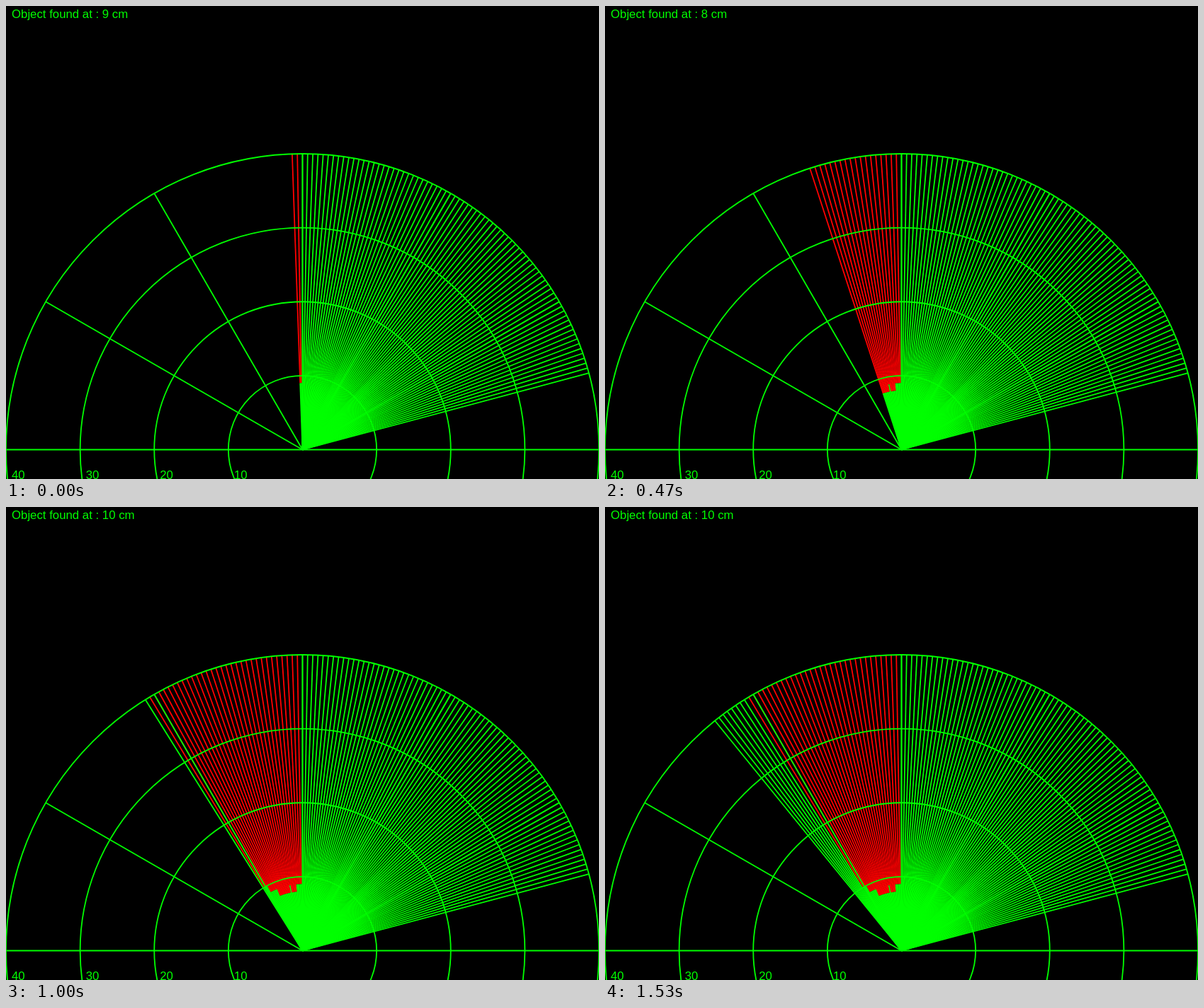
An HTML page with a canvas for the animation above (1590 ms loop, 837 px wide and 669 px high).

```html
<!DOCTYPE html>
<html lang="en">
<head>
<meta charset="utf-8">
<title>Radar sweep</title>
<style>
  html, body { margin: 0; height: 100%; overflow: hidden; background: #000; }
  canvas { display: block; }
</style>
</head>
<body>
<canvas width="837" height="669"></canvas>
<script>
const ctx = document.querySelector('canvas').getContext('2d');
const CX = 418.5, CY = 627.5, R = 418.5, CM = R / 40;
const GREEN = '#0f0', RED = '#f00';
const LOOP = 1590, STEPS = 24, FIRST_ANGLE = 15;

// [step, sweep angle in degrees]
const sweep = [[0, 92], [4, 100], [7, 108], [9, 111], [13, 119], [17, 124], [23, 129]];

// Measured distance in cm for an angle; 40 means nothing in range
function distance(angle) {
  if (angle < 91 || angle > 121) return 40;
  if (angle >= 119) return 10;
  return angle <= 95 || angle === 101 || angle >= 113 ? 9 : 8;
}

function sweepAngle(step) {
  const i = Math.max(1, sweep.findIndex(([s]) => s >= step));
  const [s0, a0] = sweep[i - 1], [s1, a1] = sweep[i];
  return Math.round(a0 + (a1 - a0) * (step - s0) / (s1 - s0));
}

// Steps run at 15 per second, rounded to 10 ms
function stepAt(time) {
  let step = STEPS - 1;
  while (time < Math.round(step * 20 / 3) * 10) step--;
  return step;
}

function ray(angle, from, to, color) {
  const a = angle * Math.PI / 180, dx = Math.cos(a), dy = -Math.sin(a);
  ctx.strokeStyle = color;
  ctx.beginPath();
  ctx.moveTo(CX + dx * from, CY + dy * from);
  ctx.lineTo(CX + dx * to, CY + dy * to);
  ctx.stroke();
}

function drawGrid() {
  for (let angle = 0; angle <= 180; angle += 30) ray(angle, 0, R, GREEN);
  for (let cm = 10; cm <= 40; cm += 10) {
    ctx.beginPath();
    ctx.arc(CX, CY, cm * CM, 0, 2 * Math.PI);
    ctx.stroke();
    ctx.fillText(cm, 8 + R - cm * CM, 669);
  }
}

function draw(step) {
  const current = sweepAngle(step);
  ctx.clearRect(0, 0, 837, 669);
  ctx.lineWidth = 1.8;
  ctx.font = '16.8px "Liberation Sans", Arial, sans-serif';
  ctx.fillStyle = GREEN;

  for (let angle = FIRST_ANGLE; angle <= current; angle++) {
    const reach = distance(angle) * CM;
    if (reach < R) ray(angle, reach, R, RED);
    ray(angle, 0, reach, GREEN);
  }
  drawGrid();

  // The last detection stays on display
  const found = distance(Math.min(current, 121));
  ctx.fillText(`Object found at : ${found} cm`, 8, 17);
}

const start = performance.now();
function tick() {
  draw(stepAt((performance.now() - start) % LOOP));
  requestAnimationFrame(tick);
}
tick();
</script>
</body>
</html>
```
